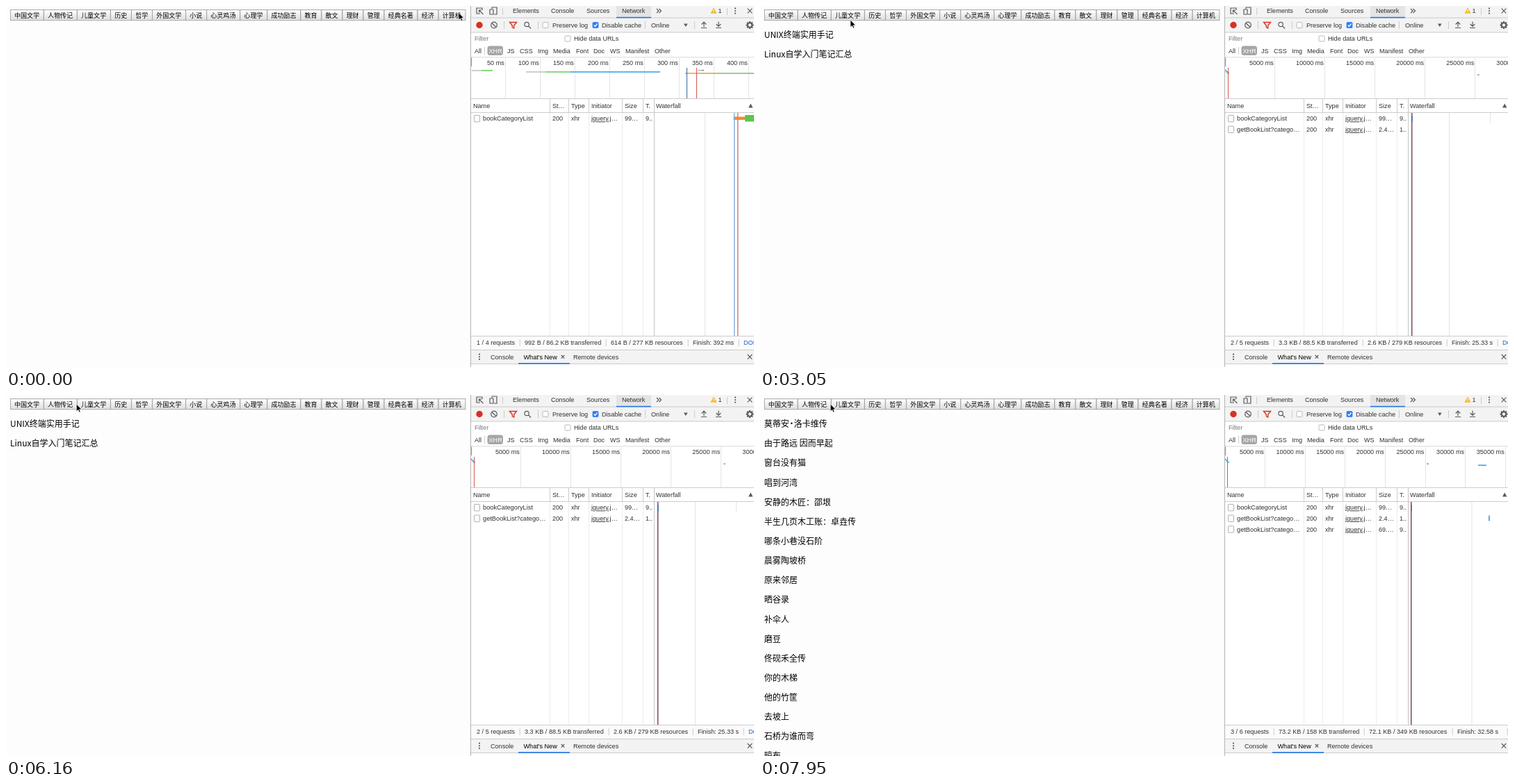
Animation, 1076 px wide and 520 px high, one loop 8000 ms. Source, as an HTML page:

```html
<!DOCTYPE html>
<html lang="zh-CN">
<head>
<meta charset="utf-8">
<title>Book categories</title>
<style>
html, body { margin: 0; width: 100%; height: 100%; overflow: hidden; background: #fdfdfd; }
svg { display: block; }
text { font: 9.1px "Liberation Sans", Arial, sans-serif; fill: #303030; white-space: pre; }
.cjk { font: 9.05px "Noto Sans CJK SC", "Noto Sans CJK", sans-serif; fill: #000; }
.book { font-size: 12px; }
.icon { fill: none; stroke: #5a5a5a; stroke-width: 1.2; }
</style>
</head>
<body>
<svg id="stage" width="1076" height="520" viewBox="0 0 1076 520"></svg>
<script>
const LOOP = 8000;
const GREY = '#ccc', PALE = '#e4e4e4', INK = '#5a5a5a', ACCENT = '#1a73e8';
const RED = '#d93025', BLUE = '#2196e8', GREEN = '#5bc74c', ORANGE = '#f0902a';

const box = (x, y, w, h, fill, extra = '') =>
  `<rect x="${x}" y="${y}" width="${w}" height="${h}" fill="${fill}" ${extra}/>`;
const vline = (x, y1, y2, fill = GREY, w = 1) => box(x, y1, w, y2 - y1, fill);
const hline = (y, x = 669, fill = GREY) => box(x, y, 1076 - x, 1, fill);
const text = (x, y, s, extra = '') => `<text x="${x}" y="${y}" ${extra}>${s}</text>`;
const path = (d, extra = 'class="icon"') => `<path d="${d}" ${extra}/>`;
const each = (list, fn) => list.map(fn).join('');
const cross = (x, y, r) => path(`M${x - r} ${y - r}l${2 * r} ${2 * r}m0 ${-2 * r}l${-2 * r} ${2 * r}`);
const dots = (x, y) => each([-3.6, 0, 3.6], d => `<circle cx="${x}" cy="${y + d}" r="1.1" fill="${INK}"/>`);
const check = (x, y, on) =>
  box(x - 4, y - 4, 8, 8, on ? '#2f7cf6' : '#fff', `rx="1.3" stroke="${on ? '#2f7cf6' : '#a8a8a8'}" stroke-width=".8"`) +
  (on ? path(`M${x - 2.3} ${y}l1.8 2l3-4`, 'fill="none" stroke="#fff" stroke-width="1.3"') : '');

const categories = '中国文学 人物传记 儿童文学 历史 哲学 外国文学 小说 心灵鸡汤 心理学 成功励志 教育 散文 理财 管理 经典名著 经济 计算机'.split(' ');

function buttons() {
  let x = 6;
  return each(categories, name => {
    const w = 12.05 + 9 * name.length, left = x;
    x += w;
    return box(left + .4, 5.5, w - .3, 15.2, 'url(#face)', 'stroke="#a2a2a2" stroke-width=".9"') +
      text(left + w / 2, 16.5, name, 'class="cjk" text-anchor="middle"');
  });
}

function toolbar() {
  const tabs = [[729, 'Elements'], [784, 'Console'], [835, 'Sources'], [886, 'Network']];
  const types = [[674, 'All'], [721, 'JS'], [739, 'CSS'], [765, 'Img'], [787, 'Media'], [820, 'Font'],
    [845, 'Doc'], [869, 'WS'], [891, 'Manifest'], [933, 'Other']];
  const teeth = each([0, 45, 90, 135], a => box(1068.9, 22, 2.2, 11, INK, `transform="rotate(${a} 1070 27.5)"`));
  return box(669, 0, 407, 38, '#f3f3f3') + box(878, 0, 50, 17, '#e4e4e4') +
    hline(16.5) + box(878, 15.8, 50, 1.5, ACCENT) + hline(37.5) + hline(73.5) +
    each(tabs, ([x, s]) => text(x, 10.3, s)) +
    path('M682 11h-5v-8h8v3M680.5 6l6 6m-6-2.5v-3.5h3.5') +
    path('M699 4v-2h7v10h-4M696 5h5v7h-5z') + vline(714, 3, 13) +
    path('M936 4l3 3l-3 3m3.5-6l3 3l-3 3') +
    path('M1018 2.3l4.6 8.4h-9.2z', 'fill="#f4b92c"') + vline(1017.5, 5, 8, '#fff') + vline(1017.5, 8.7, 9.7, '#fff') +
    text(1024.5, 10.3, '1') + vline(1037, 3, 13) + dots(1049, 7) + cross(1070, 7, 3.3) +
    `<circle cx="681" cy="27.5" r="4.7" fill="${RED}"/>` +
    path('M706.3 27.5a4.3 4.3 0 1 1-8.6 0a4.3 4.3 0 1 1 8.6 0M699 24.5l6 6') + vline(716, 22, 33) +
    path('M724.5 23.5h10l-3.8 4.5v4l-2.4-1.5v-2.5z', `fill="none" stroke="${RED}" stroke-width="1.4"`) +
    path('M752.3 26.5a3.2 3.2 0 1 1-6.4 0a3.2 3.2 0 1 1 6.4 0M751.5 28.8l3.7 3.7') + vline(765, 22, 33) +
    check(776, 27.5) + text(786, 30.7, 'Preserve log') + check(848, 27.5, true) + text(857, 30.7, 'Disable cache') +
    vline(919, 22, 33) + text(928, 30.7, 'Online') + path('M975 25.5h5.6l-2.8 4.6z', `fill="${INK}"`) + vline(990, 22, 33) +
    path('M1000 31.5h8M1004 30v-7m-3.3 3.5l3.3-3.5l3.3 3.5') +
    path('M1021 31.5h8M1025 22.5v7m-3.3-3.5l3.3 3.5l3.3-3.5') +
    teeth + `<circle cx="1070" cy="27.5" r="3.1" fill="#f3f3f3" stroke="${INK}" stroke-width="1.8"/>` +
    text(674, 50.3, 'Filter', 'style="fill:#777"') + check(808, 47) + text(817, 50.3, 'Hide data URLs') +
    each(types, ([x, s]) => text(x, 67.5, s)) + vline(688, 59, 70) +
    box(692.5, 57.5, 22.5, 13.5, '#a6a6a6', 'rx="3.5"') + text(694.5, 67.5, 'XHR', 'style="fill:#fff"');
}

const columns = [782, 809, 838, 886, 916];

function tableFrame() {
  const heads = [[672, 'Name'], [786, 'St…'], [813, 'Type'], [842, 'Initiator'], [890, 'Size'], [920, 'T.'], [935, 'Waterfall']];
  return hline(133) + hline(153) +
    each(columns, x => vline(x, 134, 153) + vline(x, 154, 475, '#ececec')) + vline(932, 134, 475, '#c4c4c4') +
    each(heads, ([x, s]) => text(x, 147, s)) + path('M1068 146.5h6.4l-3.2-6z', `fill="${INK}"`) +
    box(669, 475, 407, 20, '#fbfbfb') + box(669, 495, 407, 20, '#f3f3f3') + hline(475) + hline(495) + hline(515) +
    dots(681, 505.3) + text(697, 508.5, 'Console') + text(744.5, 508.5, "What's New", 'style="fill:#000"') +
    cross(801, 505.3, 2.3) + box(737, 514.2, 74, 1.6, ACCENT) + text(816, 508.5, 'Remote devices') + cross(1070, 505.3, 3.3);
}

// Each bar is [x, y, width, colour].
const specks = [[669, 92, 2, BLUE], [670, 94, 3, BLUE], [672, 96, 3, '#4a9a8a']];
const overviews = {
  first: { start: 718, gap: 50, unit: 50, red: 993, blue: 979, bars: [
    [670, 92.3, 14, '#bbb'], [684, 92.3, 16, GREEN], [748, 94.3, 28, '#bbb'], [776, 94.3, 36, GREEN], [812, 94.3, 129, BLUE],
    [977, 96.3, 46, ORANGE], [1023, 96.3, 53, GREEN], [995, 92, 6, '#bbb'], [1001, 92, 3, '#4a9a8a']] },
  second: { start: 740, gap: 72.1, unit: 5000, red: 673, bars: [...specks, [1032, 98.5, 3, GREEN]] },
  third: { start: 726, gap: 57.65, unit: 5000, red: 672, bars: [...specks, [959.5, 98.5, 2, INK], [1033, 100.5, 4.5, '#4a9a8a']] },
  last: { start: 726, gap: 57.65, unit: 5000, red: 672, bars: [...specks, [959.5, 98.5, 2, INK], [1033, 100.5, 12, BLUE]] }
};

function overview({ start, gap, unit, red, blue, bars }) {
  let out = box(669, 74.5, 407, 58.5, '#fff');
  for (let i = 0; i < 8; i++) {
    const x = start + gap * i;
    out += vline(Math.round(x), 75, 133, PALE) + text(x - 1.2, 85.1, `${unit * (i + 1)} ms`, 'text-anchor="end"');
  }
  return out + box(668, 74.5, 2.2, 12.5, '#a0a0a0') +
    each(bars, ([x, y, w, c]) => box(x, y, w, 1.4, c)) +
    (blue ? vline(blue, 89, 133, '#3d6a9e') : '') + vline(red, 89, 133, '#d0584c');
}

const names = ['bookCategoryList', 'getBookList?catego…', 'getBookList?catego…'];
const grid = x => vline(x, 154, 475, PALE);
const thin = x => vline(x, 154, 475, '#7c3d58', 1.4) + vline(x + 1, 158, 167, '#4a9ad8');
const late = x => vline(x, 173.5, 181.5, BLUE, 1.5);
const tables = {
  first: { cells: [['99…', '9..']], fall: grid(1005) +
    box(1046.5, 159.5, 17, 4.5, ORANGE) + box(1063, 157, 13, 9.5, GREEN) +
    vline(1047, 154, 475, '#7eafdc', 1.4) + vline(1052, 154, 475, '#d87a70', 1.4) },
  second: { cells: [['99…', '9..'], ['2.4…', '1..']], fall: grid(991) + vline(1050, 154, 169, PALE) + thin(937) },
  started: { cells: [['99…', '9..'], ['2.4…', '1..'], ['', '']], fall: grid(1025) + thin(936) + late(1050.3) },
  third: { cells: [['99…', '9..'], ['2.4…', '1..'], ['56.…', '2..']], fall: grid(1025) + thin(936) + late(1050.3) },
  last: { cells: [['99…', '9..'], ['2.4…', '1..'], ['69.…', '9..']], fall: grid(1023.5) + thin(936) + late(1048.2) }
};

function table({ cells, fall }) {
  return each(cells, ([size, time], i) => {
    const y = 165.4 + 15.65 * i;
    return box(673.5, y - 8, 8, 9.5, '#fff', 'rx=".8" stroke="#a8a8a8" stroke-width=".9"') +
      text(686, y, names[i], 'style="font-size:9.25px"') + text(786, y, size && '200') + text(813, y, 'xhr') +
      text(842, y, '<tspan text-decoration="underline">jquery.j</tspan>…') + text(890, y, size) + text(920, y, time);
  }) + fall;
}

const statuses = {
  first: [[677, '1 / 4 requests'], [746, '992 B / 86.2 KB transferred'], [870, '614 B / 277 KB resources'], [988, 'Finish: 392 ms'], [1061, 'DOMContentLoaded']],
  second: [[677, '2 / 5 requests'], [746, '3.3 KB / 88.5 KB transferred'], [874, '2.6 KB / 279 KB resources'], [995, 'Finish: 25.33 s'], [1068, 'DOMContentLoaded']],
  third: [[677, '3 / 6 requests'], [746, '59.9 KB / 145 KB transferred'], [876, '64.4 KB / 341 KB resources'], [1003, 'Finish: 31.93 s'], [1082, '']],
  last: [[677, '3 / 6 requests'], [746, '73.2 KB / 158 KB transferred'], [876, '72.1 KB / 349 KB resources'], [1003, 'Finish: 32.58 s'], [1082, '']]
};
const status = parts => each(parts, ([x, s], i) =>
  (i ? vline(x - 7.3, 480, 490) : '') + text(x, 488.4, s, i === 4 ? 'style="fill:#1a5fd0"' : ''));

const shelves = {
  none: [],
  computing: ['UNIX终端实用手记', 'Linux自学入门笔记汇总'],
  lives: ['莫蒂安·洛卡维传', '由于路远 因而早起', '窗台没有猫', '唱到河湾', '安静的木匠：邵垠', '半生几页木工账：卓垚传',
    '哪条小巷没石阶', '晨雾陶坡桥', '原来邻居', '晒谷录', '补伞人', '磨豆', '佟砚禾全传', '你的木梯', '他的竹筐',
    '去坡上', '石桥为谁而弯', '晾布']
};
// The middle dot is set tighter than a full-width character.
const tighten = s => s.replace(/·(.)/, '<tspan dx="-2.6">·</tspan><tspan dx="-2.6">$1</tspan>');
const books = list => each(list, (s, i) => text(6, 46.2 + 28.13 * i, tighten(s), 'class="cjk book"'));

// Changes to the page and the panel: [time, changed parts].
const changes = [
  [0, { view: 'first', rows: 'first', sum: 'first', shelf: 'none' }],
  [750, { view: 'second', rows: 'second', sum: 'second' }],
  [950, { shelf: 'computing' }],
  [7060, { rows: 'started' }],
  [7210, { view: 'third' }],
  [7360, { rows: 'third', sum: 'third' }],
  [7950, { view: 'last', rows: 'last', sum: 'last', shelf: 'lives' }]
];

// Pointer sweeps: [first time, last time, tip positions in even steps].
const sweeps = [
  [0, 0, [[651, 9.5]]],
  [1580, 2160, [[640, 18], [585, 26], [470, 22], [350, 10], [274.5, -2.5]]],
  [2460, 3490, [[240, 8], [160, 20], [102, 26], [92.5, 24], [130, 20], [200, 16], [285, 13], [362, 12]]],
  [3640, 4680, [[410, 11.5], [443, 11.5], [410, 14], [310, 17], [205, 20], [140, 19], [185, 18], [300, 16]]],
  [4830, 5870, [[407, 14], [340, 16], [270, 20], [210, 24], [165, 26], [138, 25], [125, 23], [119.5, 21]]],
  [6020, 6160, [[107, 16], [101.3, 13]]]
];
const tips = sweeps.flatMap(([from, to, points]) =>
  points.map((p, i) => [from + (to - from) * i / Math.max(1, points.length - 1), p]));

const stage = document.getElementById('stage');
stage.innerHTML = `<defs><linearGradient id="face" x2="0" y2="1"><stop stop-color="#fff"/><stop offset="1" stop-color="#dedede"/></linearGradient></defs>` +
  box(0, 0, 1076, 520, '#fdfdfd') + buttons() + '<g id="shelf"></g>' +
  box(669, 0, 407, 520, '#fff') + toolbar() + '<g id="view"></g>' + tableFrame() +
  '<g id="rows"></g><g id="sum"></g>' + vline(668, 0, 520, '#b4b4b4') +
  path('M0 0v10.6l2.5-2.2l1.6 3.7l1.8-.8l-1.6-3.5h3.3z', 'id="tip" fill="#000" stroke="#fff" stroke-width=".7"');

const parts = {
  view: k => overview(overviews[k]), rows: k => table(tables[k]),
  sum: k => status(statuses[k]), shelf: k => books(shelves[k])
};
const shown = {};
const tip = document.getElementById('tip');

function draw(t) {
  const now = Object.assign({}, ...changes.filter(c => c[0] <= t).map(c => c[1]));
  for (const id in parts) {
    if (shown[id] === now[id]) continue;
    document.getElementById(id).innerHTML = parts[id](now[id]);
    shown[id] = now[id];
  }
  const [x, y] = tips.filter(p => p[0] <= t).pop()[1];
  tip.setAttribute('transform', `translate(${x} ${y})`);
}

const begin = performance.now();
function tick() {
  draw((performance.now() - begin) % LOOP);
  requestAnimationFrame(tick);
}
tick();
</script>
</body>
</html>
```
